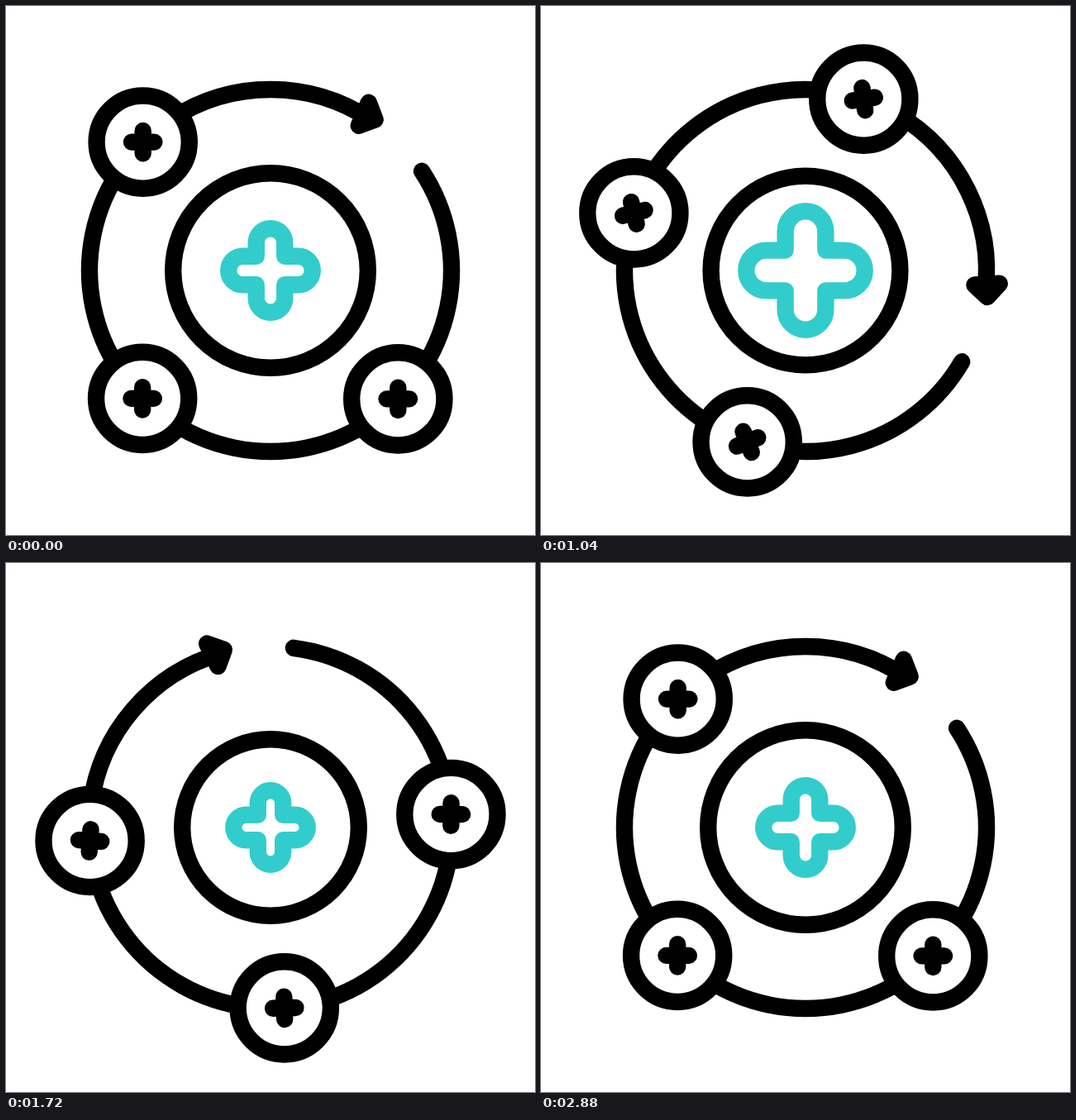
Animation of 640 by 640 pixels, one loop 3 s. Source, as an HTML page with a canvas:

```html
<!DOCTYPE html>
<html lang="en">
<head>
<meta charset="utf-8">
<title>Orbit</title>
<style>
  html, body { margin: 0; width: 100%; height: 100%; overflow: hidden; background: #fff; }
  canvas { display: block; width: 640px; height: 640px; }
</style>
</head>
<body>
<canvas id="stage" width="640" height="640"></canvas>
<script>
const ctx = document.getElementById('stage').getContext('2d');
const LOOP = 3000, STEP = 40, REST = 2880;
const TURN_START = 345.5, TURN_END = 2621.6;
const ORBIT = 219, STROKE = 20.4;
const INK = '#000', TEAL = '#33cccc', PAPER = '#fff';

// Swing is in radians per second, decay in seconds.
const satellites = [
  { angle: -134.8, swing: 1.75, decay: 0.346 },
  { angle: 135, swing: 0, decay: 0.268 },
  { angle: 45.2, swing: 1.155, decay: 0.676 }
];
const ringPulse = { rest: 117.8, low: 105.6, high: 123.6, start: 200, first: 790, half: 507, end: 2880 };
const crossPulse = { rest: 50.8, low: 44, high: 75, start: 200, first: 630, half: 520, end: 2700 };

const rad = deg => deg * Math.PI / 180;
const clamp = u => Math.max(0, Math.min(1, u));
const ease = (a, b, u) => a + (b - a) * (1 - Math.cos(Math.PI * clamp(u))) / 2;

// Shrinks from rest, swells twice, then settles back to rest.
function pulse({ rest, low, high, start, first, half, end }, t) {
  const last = first + 3 * half;
  if (t < first) return ease(rest, low, (t - start) / (first - start));
  if (t > last) return ease(high, rest, (t - last) / (end - last));
  return (low + high) / 2 - (high - low) / 2 * Math.cos(Math.PI * (t - first) / half);
}

function bezier(a, b, c, d, s) {
  const r = 1 - s;
  return r * r * r * a + 3 * r * r * s * b + 3 * r * s * s * c + s * s * s * d;
}

// One full turn that pulls back first and overshoots at the end.
function turn(t) {
  const u = clamp((t - TURN_START) / (TURN_END - TURN_START));
  let lo = 0, hi = 1;
  for (let i = 0; i < 40; i++) {
    const mid = (lo + hi) / 2;
    if (bezier(0, 0.4223, 0.4444, 1, mid) < u) lo = mid; else hi = mid;
  }
  return 360 * bezier(0, -0.275, 1.35, 1, lo);
}

// A quick tilt that swings back and fades out by the end of the turn.
function tilt({ swing, decay }, t) {
  if (t <= TURN_START || t >= TURN_END) return 0;
  const span = (TURN_END - TURN_START) / 1000;
  const shape = u => u ** 1.5 * Math.exp(-u / decay) * Math.cos(swing * u) * (1 - u / span);
  return -22 * shape((t - TURN_START) / 1000) / shape(0.375);
}

function circle(r) {
  ctx.beginPath();
  ctx.arc(0, 0, r, 0, Math.PI * 2);
  ctx.fillStyle = PAPER;
  ctx.fill();
  ctx.stroke();
}

function drawOrbit(angle) {
  ctx.save();
  ctx.rotate(rad(angle));
  ctx.beginPath();
  ctx.arc(0, 0, ORBIT, rad(-33.3), rad(303.5));
  ctx.stroke();
  ctx.beginPath();
  ctx.moveTo(118.8, -203.2);
  ctx.lineTo(126.7, -182.6);
  ctx.lineTo(106.8, -175.2);
  ctx.closePath();
  ctx.fillStyle = INK;
  ctx.fill();
  ctx.stroke();
  ctx.restore();
}

function drawSatellite(angle, lean) {
  ctx.save();
  ctx.translate(ORBIT * Math.cos(rad(angle)), ORBIT * Math.sin(rad(angle)));
  circle(56.1);
  ctx.rotate(rad(lean));
  for (let i = 0; i < 2; i++) {
    ctx.beginPath();
    ctx.moveTo(-13.7, 0);
    ctx.lineTo(13.7, 0);
    ctx.stroke();
    ctx.rotate(Math.PI / 2);
  }
  ctx.restore();
}

function drawCross(size) {
  const w = size * 0.34;
  ctx.save();
  ctx.strokeStyle = TEAL;
  ctx.beginPath();
  for (let i = 0; i < 4; i++) {
    ctx.lineTo(-w, -w);
    ctx.arc(0, w - size, w, Math.PI, 0);
    ctx.lineTo(w, -w);
    ctx.rotate(Math.PI / 2);
  }
  ctx.closePath();
  ctx.stroke();
  ctx.restore();
}

function draw(t) {
  ctx.setTransform(1, 0, 0, 1, 0, 0);
  ctx.fillStyle = PAPER;
  ctx.fillRect(0, 0, 640, 640);
  ctx.translate(320, 320);
  ctx.lineWidth = STROKE;
  ctx.lineCap = ctx.lineJoin = 'round';
  ctx.strokeStyle = INK;

  const angle = turn(t);
  drawOrbit(angle);
  for (const s of satellites) drawSatellite(s.angle + angle, tilt(s, t));
  circle(pulse(ringPulse, t));
  drawCross(pulse(crossPulse, t));
}

const start = performance.now();
function frame() {
  const t = (performance.now() - start) % LOOP;
  draw(Math.min(REST, Math.floor(t / STEP) * STEP));
  requestAnimationFrame(frame);
}
frame();
</script>
</body>
</html>
```
